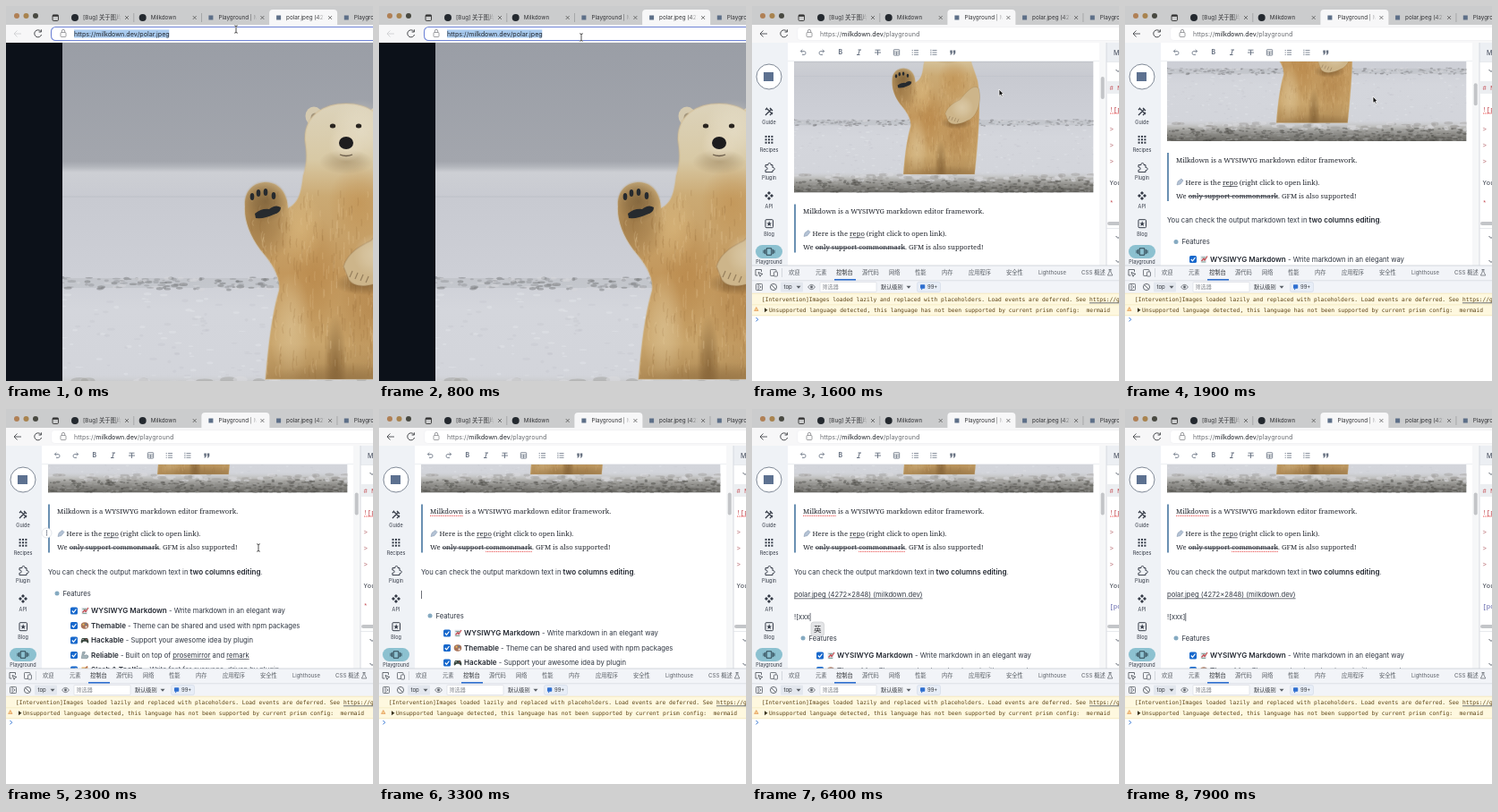
Recreate the animation shown at these times as an HTML page with a canvas. Size 410 px wide and 419 px high, loop 8000 ms.

```html
<!DOCTYPE html>
<html lang="en">
<head>
<meta charset="utf-8">
<title>Markdown editor demo</title>
<style>
html, body { margin: 0; width: 100%; height: 100%; overflow: hidden; background: #fff; }
canvas { display: block; width: 410px; height: 419px; }
</style>
</head>
<body>
<canvas id="stage"></canvas>
<script>
const W = 410, H = 419, LOOP = 8000;
const stage = document.getElementById('stage');
const dpr = window.devicePixelRatio || 1;
stage.width = W * dpr;
stage.height = H * dpr;
const c = stage.getContext('2d');
c.scale(dpr, dpr);

const SANS = 'Inter, "Noto Sans CJK SC", "Noto Sans CJK", sans-serif';
const SERIF = '"Noto Serif", serif';
const MONO = '"DejaVu Sans Mono", monospace';
const INK = '#3b4252';

function rect(x, y, w, h, fill) { c.fillStyle = fill; c.fillRect(x, y, w, h); }

function box(x, y, w, h, r, fill, line, lw = 0.8) {
  c.beginPath();
  c.roundRect(x, y, w, h, r);
  if (fill) { c.fillStyle = fill; c.fill(); }
  if (line) { c.strokeStyle = line; c.lineWidth = lw; c.stroke(); }
}

function oval(x, y, rx, ry, fill, line, lw = 0.8, turn = 0) {
  c.beginPath();
  c.ellipse(x, y, rx, ry, turn, 0, 7);
  if (fill) { c.fillStyle = fill; c.fill(); }
  if (line) { c.strokeStyle = line; c.lineWidth = lw; c.stroke(); }
}

function path(d, line, lw = 0.9, fill) {
  const p = new Path2D(d);
  if (fill) { c.fillStyle = fill; c.fill(p); }
  if (line) { c.strokeStyle = line; c.lineWidth = lw; c.stroke(p); }
}

function at(x, y, draw) { c.save(); c.translate(x, y); draw(); c.restore(); }

function clip(x, y, w, h, draw) {
  c.save();
  c.beginPath();
  c.rect(x, y, w, h);
  c.clip();
  draw();
  c.restore();
}

// y is the middle of the capitals; returns the right edge
function text(s, x, y, size, fill = INK, font = SANS, weight = 400, align = 'left') {
  c.font = `${weight} ${size}px ${font}`;
  c.textAlign = align;
  c.fillStyle = fill;
  c.fillText(s, x, y + size * 0.36);
  return x + c.measureText(s).width;
}

function body(s, x, y) { return text(s, x, y, 7.65, '#2f3642'); }
function bold(s, x, y) { return text(s, x, y, 8.1, '#252a33', SANS, 600); }
function quote(s, x, y) { return text(s, x, y, 7.68, '#20242c', SERIF); }
function under(x, end, y) { rect(x, y, end - x, 0.7, '#2e3440'); }

function squiggle(x, end, y) {
  c.setLineDash([1, 0.7]);
  path(`M${x} ${y}H${end}`, '#ec4b4b', 1);
  c.setLineDash([]);
}

function random(seed) {
  return () => (seed = (seed * 16807) % 2147483647) / 2147483647;
}

function specks(seed, n, x, y, w, h, size, tones) {
  const r = random(seed);
  for (let i = 0; i < n; i++) {
    oval(x + r() * w, y + r() * h, size * (0.5 + r()), size * (0.2 + r() * 0.4), tones[i % tones.length]);
  }
}

// soft blob that fades out from rgb at the given strength
function glow(x, y, rx, ry, rgb, strength) {
  at(x, y, () => {
    c.scale(rx, ry);
    const g = c.createRadialGradient(0, 0, 0, 0, 0, 1);
    g.addColorStop(0, `rgba(${rgb},${strength})`);
    g.addColorStop(0.5, `rgba(${rgb},${strength * 0.6})`);
    g.addColorStop(1, `rgba(${rgb},0)`);
    oval(0, 0, 1, 1, g);
  });
}

// Photo area: 63,41 with 621 x 414
function photo() {
  clip(63, 41, 622, 414, () => {
    const g = c.createLinearGradient(0, 41, 0, 455);
    [[0, '#9a9ea6'], [0.32, '#a3a6ad'], [0.335, '#b3b6bc'], [0.35, '#cdcfd4'], [0.42, '#c8cad1'],
     [0.62, '#cdcfd6'], [0.72, '#d4d6dc'], [1, '#d2d4da']].forEach(s => g.addColorStop(...s));
    rect(63, 41, 622, 414, g);
    rect(63, 212, 622, 2, 'rgba(172,175,184,.2)');
    rect(63, 304, 622, 11, 'rgba(160,163,168,.25)');
    specks(11, 330, 63, 303, 622, 14, 3.2, ['rgba(120,121,124,.5)', 'rgba(150,152,155,.5)', 'rgba(215,216,220,.5)']);
    specks(5, 240, 63, 320, 622, 95, 3, ['rgba(235,237,241,.3)', 'rgba(185,188,196,.22)']);
    const shore = c.createLinearGradient(0, 412, 0, 455);
    [[0, 'rgba(205,206,208,0)'], [0.3, '#bdbdbb'], [0.55, '#979692'], [1, '#686762']]
      .forEach(s => shore.addColorStop(...s));
    rect(63, 412, 622, 43, shore);
    specks(7, 420, 63, 428, 622, 28, 4, ['rgba(90,89,84,.5)', 'rgba(165,165,162,.45)', 'rgba(70,69,65,.45)']);
    specks(9, 90, 63, 417, 622, 14, 7, ['rgba(218,219,222,.55)', 'rgba(150,149,145,.4)']);
    bear();
  });
}

function bear() {
  const g = c.createLinearGradient(0, 108, 0, 425);
  [[0, '#dcd3bb'], [0.2, '#d8c9a5'], [0.33, '#cbaa74'], [0.6, '#c3985d'], [0.85, '#c9a56c'], [1, '#a98450']]
    .forEach(s => g.addColorStop(...s));
  oval(344, 123, 9.5, 10.5, '#d5cab0');
  oval(415, 123, 9.5, 10.5, '#d5cab0');
  oval(345, 125, 4.5, 5.5, '#a0937c');
  const shape = 'M334 150C333 122 355 109 380 109C406 109 427 124 426 150C426 180 436 195 444 222' +
    'C452 262 446 340 438 417H290C293 380 297 345 305 318' +
    'C307 304 299 289 284 272C272 256 266 238 267 224C266 207 276 197 291 197' +
    'C307 198 314 211 315 226C328 220 330 206 332 190C337 174 336 164 334 150Z';
  path(shape, 'rgba(205,180,135,.35)', 2, g);
  c.save();
  c.clip(new Path2D(shape));
  glow(284, 238, 38, 52, '125,88,42', 0.55);
  glow(345, 305, 30, 70, '176,122,58', 0.4);
  glow(405, 340, 42, 70, '170,120,62', 0.45);
  glow(395, 220, 35, 42, '188,134,66', 0.45);
  glow(330, 250, 25, 42, '226,192,132', 0.45);
  glow(318, 360, 24, 62, '228,207,164', 0.5);
  glow(368, 400, 13, 55, '112,78,38', 0.55);
  glow(380, 420, 90, 22, '116,85,46', 0.4);
  c.lineCap = 'round';
  const r = random(23);
  for (let i = 0; i < 420; i++) {
    const x = 275 + r() * 165, y = 205 + r() * 200, l = 5 + r() * 9;
    path(`M${x} ${y}q${(x - 370) * 0.03} ${l / 2} 0 ${l}`,
      i % 2 ? 'rgba(140,96,46,.16)' : 'rgba(240,218,172,.16)', 1.3);
  }
  c.restore();
  glow(396, 140, 34, 36, '236,229,211', 0.5);
  glow(380, 174, 30, 14, '150,126,88', 0.5);
  glow(380, 155, 20, 19, '228,216,190', 0.9);
  path('M373 166Q380 169 387 166', 'rgba(72,58,44,.75)', 1.3);
  oval(380, 153, 8, 7, '#1d1c1e');
  oval(365, 134, 3.2, 2.5, '#29241f');
  oval(394, 134, 3.2, 2.5, '#29241f');
  glow(290, 218, 25, 24, '112,86,50', 0.65);
  [[275, 213], [282, 209], [290, 208], [299, 212]].forEach(p => oval(p[0], p[1], 2.3, 4, '#262a2e'));
  path('M278 232Q285 226 294 227Q301 221 307 225Q307 231 299 233Q289 238 279 237Z', null, 0, '#262a2e');
  glow(400, 310, 34, 13, '100,70,34', 0.55);
  path('M377 291C382 275 396 268 408 262C425 240 440 228 447 240C454 270 440 300 424 305C408 314 390 316 383 306Z',
    'rgba(140,108,66,.3)', 1.5, '#cdb58a');
  glow(412, 278, 24, 24, '226,213,184', 0.6);
  for (let i = 0; i < 4; i++) path(`M${384 + i * 6} ${303 + i * 2}l3 -7`, 'rgba(96,74,48,.5)', 1.2);
  c.lineCap = 'butt';
}

function cross(x, y) { path(`M${x - 2} ${y - 2}l4 4m0 -4l-4 4`, '#4a4a4a', 0.7); }

function tabs(active) {
  rect(0, 0, W, 22, '#cbcccd');
  ['#b08055', '#a8834e', '#484941'].forEach((f, i) => oval(12 + i * 10.5, 11, 3, 3, f));
  box(52, 10, 6.5, 6.5, 1.2, null, '#333', 0.9);
  rect(52, 9.8, 6.5, 2, '#333');
  const left = 67 + active * 75.7;
  box(left, 4, 76, 20, [4, 4, 0, 0], '#f7f7f8');
  ['[Bug] 关于图片', 'Milkdown', 'Playground | Milk', 'polar.jpeg (4272', 'Playground | Milk'].forEach((s, i) => {
    const x = 67 + i * 75.7;
    if (i < 2) oval(x + 10, 13, 4, 4, '#24292f');
    else rect(x + 8, 10.5, 5, 5, '#5d6f88');
    const fade = c.createLinearGradient(x + 53, 0, x + 62, 0);
    fade.addColorStop(0, '#303134');
    fade.addColorStop(1, 'rgba(48,49,52,0)');
    text(s, x + 19, 13, 6.3, fade);
    cross(x + 68, 13);
    if (i !== active && i !== active - 1) rect(x + 75.5, 8, 0.7, 10, '#97989a');
  });
}

function address(url, focus) {
  rect(0, 21, W, 20, '#f7f7f8');
  const dark = '#46484c', size = 7.15;
  path('M17 31H9m3.5 -3.5L9 31l3.5 3.5', focus ? '#cfd0d2' : dark, 0.9);
  path('M38.8 28.2A4 4 0 1 0 39.6 32M39.4 26.3V29H36.6', dark, 1);
  box(50.5, 23.5, 380, 15, focus ? 5 : 4, '#fff', focus ? '#6f84d6' : '#ededf0', focus ? 1.1 : 0.6);
  box(61, 29.5, 6, 5, 1, null, '#77797d', 0.7);
  path('M62.3 29.5V28a1.7 1.7 0 0 1 3.4 0V29.5', '#77797d', 0.7);
  if (focus) {
    c.font = `400 ${size}px ${SANS}`;
    rect(76, 26.5, c.measureText(url).width, 9, '#a9cbef');
  }
  const soft = focus ? '#22262c' : '#6b6e73';
  const end = text('https://', 76, 31, size, soft);
  const host = text('milkdown.dev', end, 31, size, '#22262c');
  text(url.slice(20), host, 31, size, soft);
}

const GLYPHS = [
  () => path('M-4 4L3 -3M-3 -4L4 3M-4 -2l2 -2M1 4l3 -3M1 -4l3 3', '#343a46', 1.3),
  () => { for (let i = 0; i < 9; i++) rect(-4.4 + (i % 3) * 3.4, -4.4 + (i / 3 | 0) * 3.4, 2, 2, '#343a46'); },
  () => path('M-4 -3H-1a1.6 1.6 0 1 1 3 0H4V0a1.6 1.6 0 1 1 0 3V5H-4V2.5a1.6 1.6 0 1 0 0 -3Z', '#343a46', 1),
  () => path('M0 -5L2 -3L0 -1L-2 -3ZM0 1L2 3L0 5L-2 3ZM-5 0L-3 -2L-1 0L-3 2ZM1 0L3 -2L5 0L3 2Z', null, 0, '#343a46'),
  () => {
    box(-4, -4.5, 8.5, 9, 1, null, '#343a46', 1);
    path('M0.2 -3L1 -0.8H3.2L1.4 0.5L2 2.8L0.2 1.5L-1.6 2.8L-1 0.5L-2.8 -0.8H-0.6Z', null, 0, '#343a46');
  },
  () => {
    box(-2.8, -3.8, 5.6, 7.6, 0.8, null, '#2e4450', 1.1);
    path('M-4.4 -2.6V2.6M4.4 -2.6V2.6M-6 -1.8V1.8M6 -1.8V1.8', '#2e4450', 1);
  }
];

function sidebar() {
  rect(0, 41, 40, 249, '#eff2f6');
  oval(19, 79, 14, 14, '#fff', '#737d8c', 0.9);
  rect(13, 74, 11, 10, '#5d7190');
  box(4, 267, 30, 15, 7.5, '#8cc1d0');
  ['Guide', 'Recipes', 'Plugin', 'API', 'Blog', 'Playground'].forEach((s, i) => {
    const y = 118 + i * 31.3;
    at(19, y, GLYPHS[i]);
    text(s, 19, y + 11.7, 5.5, '#343a46', SANS, 400, 'center');
  });
}

function toolbar() {
  rect(40, 41, 348, 21, '#fff');
  rect(40, 61.4, 348, 0.6, '#e2e5ea');
  const k = '#667080';
  path('M54.5 50.5H58a2 2 0 0 1 0 4H56M56.3 48.5l-2 2l2 2', k, 0.8);
  path('M80.5 50.5H77a2 2 0 0 0 0 4H79M78.7 48.5l2 2l-2 2', k, 0.8);
  text('B', 98.7, 51.7, 7, k, SANS, 700, 'center');
  path('M118.5 49H122M117 54.5H120.5M120.3 49L118.7 54.5', k, 1);
  path('M137.5 49.2H143.5M140.5 49.2V55M137 52H144', k, 0.9);
  box(158.3, 48.7, 6.4, 6.4, 0.6, null, k);
  path('M158.3 51H164.7M158.3 53H164.7M161.5 51V55', k, 0.7);
  for (let i = 0; i < 3; i++) {
    const y = 49.5 + i * 2.4;
    path(`M181 ${y}H186M201.5 ${y}H206.5`, k, 0.8);
    rect(178.7, y - 0.5, 1, 1, k);
    rect(199.5, y - 0.8, 0.8, 1.6, k);
  }
  for (const x of [221.3, 224.8]) path(`M${x} 49.5h2.5v3l-1.2 2h-1.3l0.9 -2h-0.9Z`, null, 0, k);
}

const EMOJI = [
  () => { rect(-3.5, -3.8, 6.5, 7.6, '#dfe4ea'); path('M-2.5 2L0 -1L1 1L4 -3.5', '#c2484c', 1.2); path('M-2.5 -2H2M-2.5 3H2', '#5f8d77', 0.7); },
  () => { oval(0, 0, 4.3, 3.7, '#a9745a'); oval(-1.5, -1.2, 1, 1, '#e9c45d'); oval(1.5, -1.5, 1, 1, '#59809f'); oval(1.6, 1.5, 1.1, 1, '#f4eee8'); },
  () => { path('M-3 -2.5H3Q5 1 4 3Q3 3.5 1.5 1.3H-1.5Q-3 3.5 -4 3Q-5 1 -3 -2.5Z', null, 0, '#39473f'); oval(2, -1, 0.8, 0.8, '#b65355'); rect(-3, -1.2, 2, 0.7, '#ccd1d1'); },
  () => path('M-3.8 3.5L-2.5 -3.5L0.3 -3.7L0 -1.8L-1 -1.2L-0.8 0.8Q2 -1.5 4 1Q4 4 1 3.8Z', '#657680', 0.5, '#a5b5bb'),
  () => { rect(-3.5, -3, 7, 6, '#e2a956'); path('M-3 3L3 -4', '#b36340', 1.4); }
];

const ITEMS = [
  ['WYSIWYG Markdown', 'Write markdown in an elegant way'],
  ['Themable', 'Theme can be shared and used with npm packages'],
  ['Hackable', 'Support your awesome idea by plugin'],
  ['Reliable', 'Built on top of '],
  ['Slash & Tooltip', 'Write fast for everyone, driven by plugin']
];

function link(s, x, y, write = body) {
  const end = write(s, x, y);
  under(x, end, y + 4);
  return end;
}

function features(y) {
  oval(57, y, 2.5, 2.5, '#85aac1');
  body('Features', 63.5, y);
  ITEMS.forEach(([name, rest], i) => {
    const ly = y + 19.5 + i * 16.5;
    box(72, ly - 4, 8, 8, 1.6, '#1768cc');
    path(`M73.8 ${ly}l1.7 1.8l3 -3.8`, '#fff', 1.2);
    at(88, ly, EMOJI[i]);
    let x = bold(name, 95, ly);
    x = body(' - ' + rest, x, ly);
    if (i === 3) {
      x = link('prosemirror', x, ly);
      link('remark', body(' and ', x, ly), ly);
    }
  });
}

// b is the middle of the first quote line
function article(b, s) {
  rect(40, 41, 348, 249, '#fff');
  c.save();
  c.translate(47, b - 21 - 414 / 1.86);
  c.scale(334 / 621, 1 / 1.86);
  c.translate(-63, -41);
  photo();
  c.restore();

  rect(47, b - 8, 2, 54, '#6a90b2');
  const first = quote('Milkdown', 57, b);
  quote(' is a WYSIWYG markdown editor framework.', first, b);
  path(`M58 ${b + 28}l1 -4l4 -3l2 2l-3 4Z`, '#7f91a8', 0.5, '#b3c2d5');
  let x = quote('Here is the ', 67.5, b + 25);
  x = link('repo', x, b + 25, quote);
  quote(' (right click to open link).', x, b + 25);
  const from = quote('We ', 57, b + 40);
  const mid = quote('only support ', from, b + 40);
  const to = quote('commonmark', mid, b + 40);
  rect(from, b + 40.3, to - from, 0.8, '#2e3440');
  quote('. GFM is also supported!', to, b + 40);
  if (s.focus) {
    squiggle(57, first, b + 4.8);
    squiggle(mid, to, b + 44.8);
  }

  let end = body('You can check the output markdown text in ', 47, b + 67.5);
  end = bold('two columns editing', end, b + 67.5);
  end = body('.', end, b + 67.5);
  let row = b + 67.5;
  if (s.rows > 0) {
    row = b + 93;
    end = s.pasted ? link('polar.jpeg (4272×2848) (milkdown.dev)', 47, row) : 47;
  }
  if (s.rows > 1) {
    row = b + 118;
    end = body(s.typed, 47, row);
  }
  features(b + 91.5 + s.rows * 25);
  if (s.focus) rect(end + 0.2, row - 4.6, 0.7, 9.2, '#2e3440');
  if (s.badge) {
    box(66, row + 5.5, 14.5, 16, 3, '#e4e5e7', '#c5c7ca', 0.6);
    text('英', 73.2, row + 13.5, 8.5, '#303236', SANS, 400, 'center');
  }
}

function dragHandle(y) {
  oval(45.5, y, 5.5, 5.5, '#fff', '#d4d9e0', 0.7);
  for (let i = -1; i < 2; i++) oval(45.5, y + i * 2.2, 0.7, 0.7, '#4c566a');
}

function sourcePane(s) {
  rect(388, 41, 8, 249, '#f6f7f8');
  box(389.7, 79 + s.scroll * 14.5, 4, 25, 2, '#c3c5c8');
  rect(396, 41, 14, 249, '#fff');
  rect(396, 41, 14, 21, '#eceff3');
  rect(395.6, 41, 0.8, 249, '#cfd3d9');
  rect(396, 62, 14, 0.7, '#dde1e6');
  const mono = (t, y, f = '#343a46') => text(t, 399.5, y, 7.2, f, '"Liberation Mono", monospace');
  text('Markdown', 404, 52, 7, INK);
  path('M406.5 71l2.5 2.5l2.5 -2.5M406.5 257l2.5 2.5l2.5 -2.5M406.5 284l2.5 2.5l2.5 -2.5', '#565d69', 1);
  box(397, 241, 20, 4, 2, '#c3c5c8');
  rect(396, 248, 14, 0.7, '#dde1e6');
  rect(397, 84, 13, 14, '#eceef1');
  mono('# Milkdown', 91, '#c04048');
  mono('![polar]', 115, '#c04048');
  squiggle(400, 410, 120);
  [137, 155, 173].forEach(y => mono('>', y, '#b5656b'));
  mono('You', 197);
  if (s.pasted) mono('[polar', 220, '#5b5fa8');
  else if (!s.rows) mono('*', 219.5, '#c04048');
}

function devtools() {
  const k = '#5a5f66';
  rect(0, 290, W, 129, '#fff');
  rect(0, 290, W, 31, '#f2f4f8');
  rect(0, 289.6, W, 0.8, '#c9cdd4');
  rect(0, 306.5, W, 0.7, '#d3d7de');
  path('M10.5 297V294.5H4V301H6.5M7 297.5l5 2l-2 0.8l-0.9 2Z', k);
  box(20.5, 294.5, 6.5, 7, 0.7, null, k);
  box(24.5, 297, 4, 5, 0.7, '#f2f4f8', k);
  rect(33, 293, 0.7, 10, '#c6cad1');
  [['欢迎', 41], ['元素', 71], ['控制台', 94], ['源代码', 123], ['网络', 153], ['性能', 182], ['内存', 212],
   ['应用程序', 242], ['安全性', 284], ['Lighthouse', 320], ['CSS 概述', 368]]
    .forEach(([s, x], i) => text(s, x, 298, i === 9 ? 5.9 : 6.25, i === 2 ? '#25282d' : k));
  rect(92, 305, 24, 1.6, '#2f6fd0');
  path('M398.5 294.5h3m-2.2 0v2.5l-2 4h5.5l-2 -4v-2.5', k, 0.7);

  box(4.5, 310.5, 7, 7, 0.8, null, k);
  path('M7 310.5V317.5M8.3 312.5l1.8 1.5l-1.8 1.5', k, 0.8);
  oval(24, 314, 3.6, 3.6, null, k, 0.9);
  path('M21.5 311.5l5 5', k);
  box(32, 308.5, 25, 11, 1, '#e3e7ee');
  text('top', 35.5, 314, 6.1, '#35393f');
  path('M49.5 312.7h5l-2.5 3Z', null, 0, k);
  path('M62.5 314Q66.5 308.8 70.5 314Q66.5 319.2 62.5 314Z', k, 0.8);
  oval(66.5, 314, 1.4, 1.4, k);
  box(76, 308.5, 63, 11, 1, '#fff', '#d5d9df', 0.6);
  text('筛选器', 78.5, 314, 6.1, '#85898f');
  text('默认级别', 144, 314, 6.2, '#35393f');
  path('M172.5 312.7h5l-2.5 3Z', null, 0, k);
  box(184.5, 308.5, 26, 11, 2, '#e7edf7', '#d0d8e5', 0.6);
  box(188, 311.2, 5.2, 4.6, 0.8, '#2f6fd0');
  path('M189 315.5v2l2 -2Z', null, 0, '#2f6fd0');
  text('99+', 196, 314, 5.9, '#35393f');

  rect(0, 321, W, 25, '#fef8df');
  rect(0, 320.8, W, 0.6, '#eddfa9');
  rect(0, 333.6, W, 0.6, '#f1e5b4');
  rect(0, 345.6, W, 0.6, '#eddfa9');
  const log = (s, x, y) => text(s, x, y, 6.27, '#5c4315', MONO);
  const x = log('[Intervention]Images loaded lazily and replaced with placeholders. Load events are deferred. See ', 11, 328);
  under(x, log('https://go', x, 328), 331.5);
  path('M4.8 336.5l2.2 4h-4.4Z', '#dd8a49', 0.6, '#f6cf8c');
  path('M14 337.2v5l3.5 -2.5Z', null, 0, '#3b3420');
  log('Unsupported language detected, this language has not been supported by current prism config:  mermaid', 19, 339.6);
  path('M4.5 348l2.2 2.2l-2.2 2.2', '#3577d4', 1);
}

// time, x, y
const TRACK = [[0, 257, 26], [800, 226, 35], [1100, 252, 14], [1300, 256, 18], [1600, 276, 96],
  [1900, 277, 104], [2300, 282, 155], [2700, 296, 183], [3100, 296, 183]];

const clamp = v => Math.max(0, Math.min(1, v));
const ease = v => v * v * (3 - 2 * v);

function pointer(t) {
  const i = TRACK.findIndex(p => p[0] > t);
  if (i < 0) return;
  const [t0, x0, y0] = TRACK[i - 1], [t1, x1, y1] = TRACK[i];
  const k = ease((t - t0) / (t1 - t0));
  const x = x0 + (x1 - x0) * k, y = y0 + (y1 - y0) * k;
  at(x, y, () => {
    const beam = t < 1200 ? y > 22 : t > 2000;
    if (beam) {
      const d = 'M-1.8 -4.2Q0 -4.2 0 -3V3Q0 4.2 -1.8 4.2M1.8 -4.2Q0 -4.2 0 -3M0 3Q0 4.2 1.8 4.2';
      path(d, 'rgba(255,255,255,.8)', 2);
      path(d, '#222', 0.8);
    } else {
      path('M0 -3V4.5L1.7 3L3 5.8L4.2 5.2L3 2.6H5.2Z', '#fff', 0.8, '#111');
    }
  });
}

const KEYS = [[4400, '!'], [5200, '!['], [5700, '![x'], [5900, '![xx'], [6100, '![xxx'], [7500, '![xxx]']];

function stateAt(t) {
  return {
    scroll: ease(clamp((t - 1600) / 600)),
    handle: t >= 2200 && t < 3000,
    focus: t >= 2800,
    rows: (t >= 3100) + (t >= 3900),
    pasted: t >= 3500,
    typed: KEYS.reduce((s, k) => t >= k[0] ? k[1] : s, ''),
    badge: t >= 6300 && t < 7300
  };
}

function draw(t) {
  rect(0, 0, W, H, '#fff');
  if (t < 1200) {
    rect(0, 41, 63, 378, '#0c1119');
    photo();
    tabs(3);
    address('https://milkdown.dev/polar.jpeg', true);
  } else {
    const s = stateAt(t), top = 229.5 - 115 * s.scroll;
    clip(40, 41, 348, 249, () => article(top, s));
    toolbar();
    sidebar();
    if (s.handle) dragHandle(top + 24);
    sourcePane(s);
    devtools();
    tabs(2);
    address('https://milkdown.dev/playground', false);
  }
  pointer(t);
}

let start, shown;
function tick(now) {
  start ??= now;
  const t = Math.floor(((now - start) % LOOP) / 100) * 100;
  if (t !== shown) draw(shown = t);
  requestAnimationFrame(tick);
}
draw(0);
requestAnimationFrame(tick);
</script>
</body>
</html>
```
